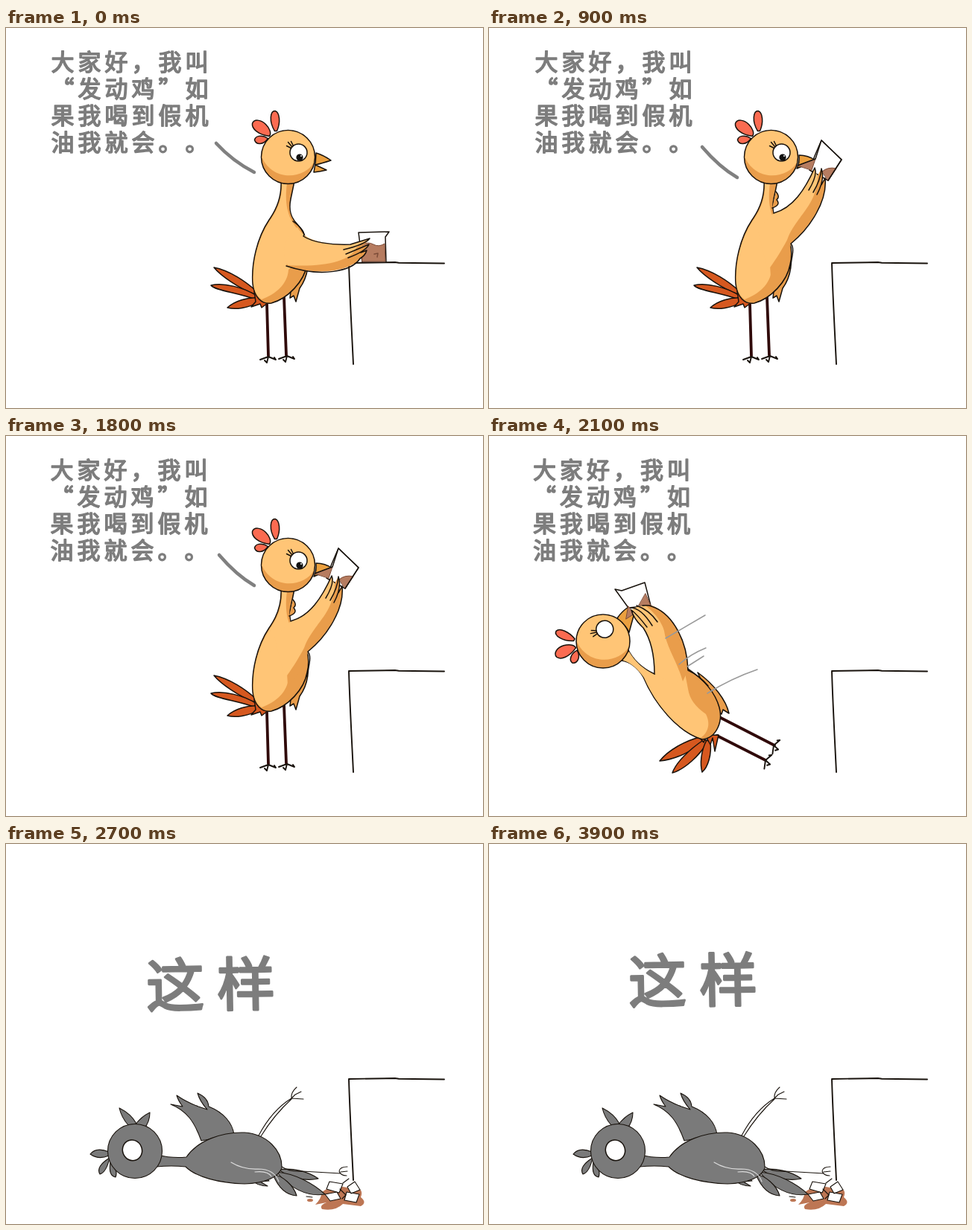
An HTML page for the animation above (4200 ms loop, 640 by 511 pixels).

```html
<!DOCTYPE html>
<html lang="zh-CN">
<head>
<meta charset="utf-8">
<style>
html, body { margin: 0; width: 100%; height: 100%; overflow: hidden; background: #fff; }
svg { display: block; width: 100%; height: 100%; }
#stage { --skin: #ffc576; --shade: #e99d4b; --comb: #fb6b51; --tail: #d6581f; --beak: #eba03f; }
.dead { --skin: #7a7a7a; --shade: #7a7a7a; --comb: #7a7a7a; --tail: #7a7a7a; --beak: #7a7a7a; }
path, circle, ellipse { fill: none; stroke: #18120c; stroke-width: 1.5; stroke-linejoin: round; stroke-linecap: round; }
.skin { fill: var(--skin); }
.shade { fill: var(--shade); }
.comb { fill: var(--comb); }
.tail { fill: var(--tail); }
.beak { fill: var(--beak); }
.light { fill: var(--skin); stroke: none; }
.dark { fill: var(--shade); stroke: none; }
.oil { fill: #b67c60; stroke: #7c4c38; stroke-width: 1; }
.white { fill: #fff; }
.dot { fill: #111; stroke: none; }
.leg { stroke: #300a0a; stroke-width: 3.8; }
.bold { stroke-width: 1.9; }
.speech { stroke: #808080; stroke-width: 4.5; }
.speed { stroke: #999; stroke-width: 1.5; }
#lie path, #lie circle { stroke-width: 1.1; }
text { font-family: "Noto Sans CJK SC", "Noto Sans CJK", sans-serif; font-size: 31px; text-anchor: middle;
  fill: #7d7d7d; stroke: #7d7d7d; stroke-width: 1.6px; stroke-linejoin: round; }
#big text { font-size: 78px; stroke-width: 3px; }
</style>
</head>
<body>
<svg id="stage" viewBox="0 0 640 511" preserveAspectRatio="none">
<defs>
  <g id="comb">
    <path class="comb" d="M-18-35C-26-48-24-62-17.500-62C-11-60-10-46-15-35Z"/>
    <path class="comb" d="M-25-28C-40-30-49-38-48-45C-46-51-37-51-30-44C-25-39-22-32-25-28Z"/>
    <path class="comb" d="M-27-25C-36-31-44-28-45-23C-43-16-33-16-27-25Z"/>
  </g>
  <g id="ball">
    <circle class="shade" r="36"/>
    <path class="light" d="M-35 1A35 35 0 1 1 34 8C24 27-18 36-35 1Z"/>
  </g>
  <g id="eye">
    <circle class="white" cx="14" cy="-6" r="11.5"/>
    <path d="M7-15L4-21M5-14L0-20M4-12L-2-15"/>
  </g>
  <path id="foot" class="bold" d="M0 0L-11 4M0 0L-2 8M0 0L10 4M-2 8L-5 5M10 4L8 1"/>
  <g id="stand">
    <path class="leg" d="M350 371L352 441M373 362L376 440"/>
    <use href="#foot" x="352" y="442"/><use href="#foot" x="377" y="441"/>
    <path class="tail" d="M334 358C312 350 288 333 279 322C300 326 322 341 336 354Z"/>
    <path class="tail" d="M335 365C312 356 280 353 275 346C292 342 320 349 336 360Z"/>
    <path class="tail" d="M339 368C326 377 307 379 297 376C307 367 324 362 338 363Z"/>
    <path class="tail" d="M333 354L335 368L329 375L341 371L343 376L351 370Z"/>
    <path class="shade" d="M402 292C409 312 405 335 394 350L389 368L386 360L381 363L382 354L385 300Z"/>
    <path class="shade" d="M369 206C370 226 363 244 353 258C337 282 329 316 331 344C333 362 343 372 356 370C378 364 400 341 404 318C409 298 403 277 391 264C382 255 379 245 382 230L387 206Z"/>
    <path class="light" d="M370 209C371 228 365 244 354 259C338 283 330 316 332 344C333 354 337 361 343 365C362 358 378 344 379 325C391 314 402 297 396 276C383 262 372 246 377 209Z"/>
    <use href="#comb" x="378.5" y="173.5"/><use href="#ball" x="378.5" y="173.5"/><use href="#eye" x="378.5" y="173.5"/>
    <circle class="dot" cx="394" cy="174" r="4.6"/><circle cx="396" cy="172" r="1" style="fill:#fff;stroke:none"/>
  </g>
</defs>

<path class="bold" d="M588 316.5L527 315.8L522 315L460 316C461 355 464 410 466 452"/>

<g id="hold">
  <path class="speech" d="M282 155Q304 179 333 194"/>
  <use href="#stand"/>
  <path class="beak" d="M416 168Q426 171 436 178Q424 182 415 184L430 191Q422 193 413 194Q416 181 416 168Z"/>
  <path class="white" d="M473 275L514 274L509 281L510 315L478 315Z"/>
  <path class="oil" d="M478 291Q486 287 493 291T508 290L509 314L478 314Z"/>
  <path d="M494 304L499 303L498 308" style="stroke:#7c4c38"/>
  <path class="dark" d="M391 270C401 286 428 292 462 291L488 283Q484 290 475 294L487 291Q484 298 476 301L484 299Q481 306 475 310C464 323 430 336 376 320Z"/>
  <path class="light" d="M391 268C401 286 428 292 462 291L486 284L470 295C464 314 424 322 378 319C367 300 375 280 391 268Z"/>
  <path d="M385 260C397 268 402 277 399 280C411 288 435 292 462 291L488 283Q482 291 453 298M456 304L487 291Q483 300 459 309M476 302L484 299Q482 306 475 310C464 327 424 336 376 320"/>
</g>

<g id="drink">
  <path id="line" class="speech"/>
  <use href="#stand"/>
  <path id="gulp" class="shade"/>
  <path class="beak" d="M416 171Q428 171 438 178L413 189Q417 181 416 171Z"/>
  <path class="white" d="M446 151L473 177L455 205L430 191L437 172Z"/>
  <path class="oil" id="oil"/>
  <path class="oil" d="M414 185L438 176L433 191Z"/>
  <path d="M414 185L438 176L446 151L473 177L455 205"/>
  <path class="dark" d="M382 249C408 242 425 216 437 188Q440 195 438 204L446 189Q449 197 446 208L451 202C455 232 430 268 405 290C402 310 392 323 378 335L374 270Z"/>
  <path class="light" d="M382 249C408 242 425 216 437 190L441 200C440 240 410 255 400 285C392 300 382 316 374 326L360 270Z"/>
  <path d="M382 249C408 242 424 217 437 188Q441 198 429 218M435 221Q445 204 446 189Q451 203 440 224M446 211L451 202C454 232 432 268 405 290Q409 294 407 306T403 324"/>
</g>

<g id="fall">
  <path class="leg" d="M311 379L383 416M306 403L371 436"/>
  <use href="#foot" transform="translate(382 416) rotate(-62)"/><use href="#foot" transform="translate(371 436) rotate(-62)"/>
  <path class="tail" d="M286 404C262 410 240 423 229 437C250 435 274 424 289 409Z"/>
  <path class="tail" d="M289 408C268 422 251 439 246 453C263 448 282 430 294 411Z"/>
  <path class="tail" d="M292 409C284 424 283 442 286 452C294 445 299 428 297 411Z"/>
  <path class="tail" d="M280 403L288 412L291 404L297 415L300 406L303 424L308 402Z"/>
  <path class="shade" d="M280 318C302 334 318 355 322 373L314 368L312 374L300 362Z"/>
  <path class="shade" d="M178 302C188 303 199 311 207 324C222 360 253 398 286 408C306 406 314 383 309 365C303 343 286 326 267 313L222 320C209 314 195 305 186 286Z"/>
  <path class="light" d="M180 302C189 304 200 313 208 325C223 360 253 396 284 406C295 398 297 386 291 374C277 364 269 354 267 340L262 314L222 321C208 314 196 304 188 290Z"/>
  <use href="#comb" transform="translate(153 276) rotate(-62)"/><use href="#ball" x="153" y="276"/>
  <use href="#eye" transform="translate(154 275) rotate(-62)"/>
  <path class="beak" d="M172 245Q178 236 187 230L194 242L188 264Q182 252 172 245Z"/>
  <path class="white" d="M169 206L178 208L209 197L217 228L187 231Z"/>
  <path class="oil" d="M210 212L217 228L201 228ZM187 229L195 239L184 246Z"/>
  <path class="light" d="M222 320C222 295 218 275 207 258Q194 246 191 234Q199 228 210 228L218 228C246 238 266 275 267 315L250 335Z"/>
  <path class="dark" d="M210 228L218 228C246 238 266 275 267 315L260 330C252 302 238 284 235 262Q230 244 210 228Z"/>
  <path d="M222 320C222 295 218 275 207 258Q194 246 191 234Q199 240 212 257M190 231Q204 231 219 255M198 228Q215 234 226 250M206 228Q214 227 218 229C246 238 266 275 267 315Q282 322 294 336"/>
  <path class="speed" d="M237 272L290 241M255 307Q271 293 291 285M266 310L288 296M293 346Q325 326 360 314"/>
</g>

<g id="lie">
  <g style="fill:#bd7654">
    <path d="M424 468Q438 457 458 462Q482 460 476 475Q485 482 476 487L452 484Q442 494 424 491Q420 486 430 482L415 485Q423 477 424 468Z" style="fill:inherit;stroke:none"/>
    <ellipse cx="408" cy="479" rx="4" ry="2" style="fill:inherit;stroke:none"/>
  </g>
  <path class="white" d="M434 454L452 457L447 469L430 464ZM458 461L468 454L475 465L463 470ZM428 471L444 468L449 477L435 480ZM457 468L474 471L470 482L454 479ZM403 474L411 475"/>
  <path d="M448 464L456 472L451 477M452 456L460 450"/>
  <path class="tail" d="M366 438C384 435 405 440 419 450C402 454 380 449 366 438Z"/>
  <path class="tail" d="M363 441C388 443 413 457 428 471C403 475 380 462 363 441Z"/>
  <path class="tail" d="M358 444C371 446 386 459 390 473C374 472 364 459 358 444Z"/>
  <path class="shade" d="M326 449C340 446 350 449 353 453L341 454L351 460Q336 460 326 449Z"/>
  <path class="bold" d="M370 434Q380 441 397 440L449 443M458 434Q448 434 447 440Q449 446 457 446M449 441L458 440"/>
  <path id="kick" class="bold" d="M339 392Q357 358 383 342L399 343M383 342L388 337L396 333M383 342Q382 334 390 327M342 393Q360 364 383 343"/>
  <path class="skin" d="M262 399C253 374 243 359 221 350L237 353Q231 345 229 338Q242 347 258 353L270 357Q260 346 257 335Q271 341 272 353C292 361 304 375 306 391Z"/>
  <path class="skin" d="M203 418Q223 423 242 421C257 399 289 387 320 388C350 390 371 412 370 436C364 450 345 456 320 457C286 456 255 448 241 434Q222 432 202 434Z"/>
  <path class="beak" d="M164 378Q155 368 152 355Q168 363 175 376ZM174 377Q181 367 193 361Q193 374 185 383Z"/>
  <path class="comb" d="M138 419Q124 425 113 417Q121 407 138 414ZM139 422Q135 441 126 444Q120 434 139 422ZM140 428Q151 439 147 448Q137 446 140 428Z"/>
  <circle class="skin" cx="173" cy="413" r="36.5"/>
  <ellipse class="white" cx="169.500" cy="412" rx="13" ry="14" transform="rotate(-20 169 412)"/>
  <path d="M302 428Q318 438 338 437Q360 437 366 454M334 441Q351 439 356 447" style="stroke:#ddd"/>
</g>

<g id="small">
  <text y="57" x="76 112 148 184 220 256">大家好，我叫</text>
  <text y="93" x="76 112 148 184 220 256">“发动鸡”如</text>
  <text y="129" x="76 112 148 184 220 256">果我喝到假机</text>
  <text y="165" x="76 112 148 184 220 256">油我就会。。</text>
</g>
<g id="big"><text y="218" x="227 322" transform="rotate(-1 274 188)">这样</text></g>
</svg>
<script>
const $ = id => document.getElementById(id);
const show = (id, on) => $(id).style.display = on ? '' : 'none';

const STEP = 300, LOOP = 4200;
const jitter = [[0, 0], [1, -1], [0, 0], [1, 0], [-1, 0], [.5, 0], [-1, 0], [-1.5, 0],
  [2, -8], [0, 0], [-2, -3], [-3, -3.5], [0, -2], [-1, -5.5]];
const drinks = {
  full: { gulp: '', oil: 'M437 182Q449 179 455 186T470 184L455 205L433 192Z', line: 'M286 160Q303 184 330 198' },
  high: { gulp: 'M386 209Q393 217 391 222Q387 228 380 226', oil: 'M439 179Q449 177 455 184T469 184L455 205L433 192Z', line: 'M286 160Q303 184 329 198' },
  low: { gulp: 'M385 220Q391 227 386 231Q392 238 380 242', oil: 'M447 193Q455 186 466 189L455 205Z', line: 'M286 160Q309 187 333 201' }
};

function draw(t) {
  const step = Math.floor(t / STEP);
  const pose = t < 300 ? 'hold' : t < 2100 ? 'drink' : t < 2200 ? 'fall' : 'lie';
  const dead = t >= 2400;
  for (const id of ['hold', 'drink', 'fall', 'lie']) show(id, id === pose);
  show('small', !dead);
  show('big', dead);
  $(dead ? 'big' : 'small').setAttribute('transform', `translate(${jitter[step]})`);
  $('lie').classList.toggle('dead', dead);
  const state = drinks[step < 3 ? 'full' : step === 5 ? 'high' : 'low'];
  for (const [id, d] of Object.entries(state)) $(id).setAttribute('d', d);
  $('kick').setAttribute('transform', `rotate(${step % 2 ? 0 : 4} 341 393)`);
}

function tick(now) {
  draw(now % LOOP);
  requestAnimationFrame(tick);
}
draw(0);
requestAnimationFrame(tick);
</script>
</body>
</html>
```
